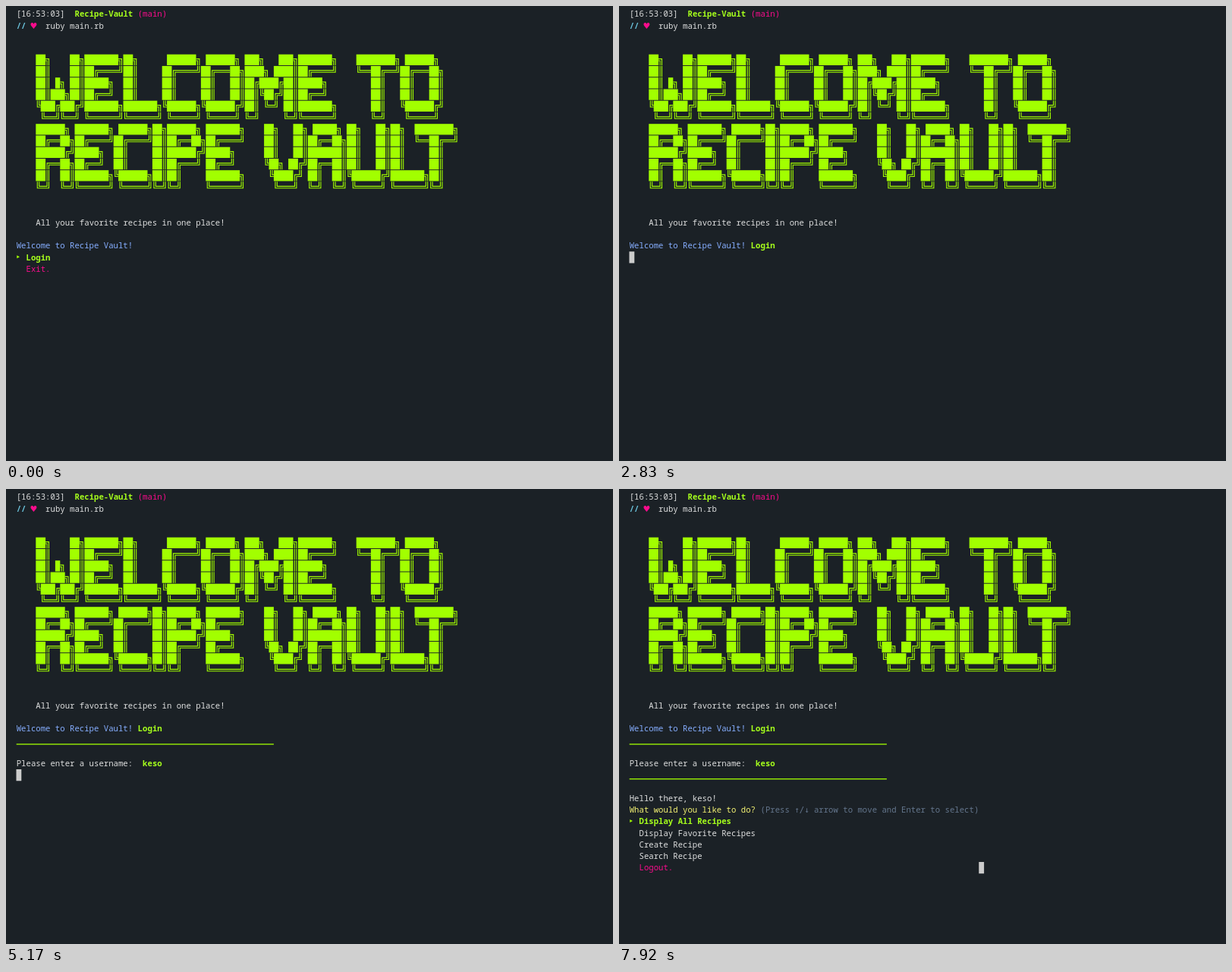
Write an HTML page with a canvas that moves like this. It is 800 by 599 pixels and loops after 8000 ms.

```html
<!DOCTYPE html>
<html lang="en">
<head>
<meta charset="utf-8">
<title>Recipe Vault</title>
<style>
  html, body { margin: 0; width: 100%; height: 100%; overflow: hidden; background: #1b2126; }
  canvas { display: block; }
</style>
</head>
<body>
<canvas id="screen" width="800" height="599"></canvas>
<script>
const ctx = document.getElementById('screen').getContext('2d');
const LOOP = 8000, CELL_W = 6.4, CELL_H = 15.25;
const BG = '#1b2126', GRAY = '#dedfdf', GREEN = '#a2ff00', LIME = '#a6ff1c', PINK = '#fa0c8c',
      BLUE = '#86aeff', CYAN = '#6cc7e0', YELLOW = '#f6f474', DIM = '#64768d';
const MONO = '10.667px "Noto Sans Mono", "DejaVu Sans Mono", monospace';
const FONT = '500 ' + MONO, STRONG = '600 ' + MONO;
const ARROWS = '10.667px "DejaVu Sans Mono", monospace';
const USER = 'keso';

const BANNER = `
██╗    ██╗███████╗██╗      ██████╗ ██████╗ ███╗   ███╗███████╗    ████████╗ ██████╗
██║    ██║██╔════╝██║     ██╔════╝██╔═══██╗████╗ ████║██╔════╝    ╚══██╔══╝██╔═══██╗
██║ █╗ ██║█████╗  ██║     ██║     ██║   ██║██╔████╔██║█████╗         ██║   ██║   ██║
██║███╗██║██╔══╝  ██║     ██║     ██║   ██║██║╚██╔╝██║██╔══╝         ██║   ██║   ██║
╚███╔███╔╝███████╗███████╗╚██████╗╚██████╔╝██║ ╚═╝ ██║███████╗       ██║   ╚██████╔╝
 ╚══╝╚══╝ ╚══════╝╚══════╝ ╚═════╝ ╚═════╝ ╚═╝     ╚═╝╚══════╝       ╚═╝    ╚═════╝
██████╗ ███████╗ ██████╗██╗██████╗ ███████╗    ██╗   ██╗ █████╗ ██╗   ██╗██╗  ████████╗
██╔══██╗██╔════╝██╔════╝██║██╔══██╗██╔════╝    ██║   ██║██╔══██╗██║   ██║██║  ╚══██╔══╝
██████╔╝█████╗  ██║     ██║██████╔╝█████╗      ██║   ██║███████║██║   ██║██║     ██║
██╔══██╗██╔══╝  ██║     ██║██╔═══╝ ██╔══╝      ╚██╗ ██╔╝██╔══██║██║   ██║██║     ██║
██║  ██║███████╗╚██████╗██║██║     ███████╗     ╚████╔╝ ██║  ██║╚██████╔╝███████╗██║
╚═╝  ╚═╝╚══════╝ ╚═════╝╚═╝╚═╝     ╚══════╝      ╚═══╝  ╚═╝  ╚═╝ ╚═════╝ ╚══════╝╚═╝`
  .slice(1).split('\n');

// Direction of the two arms of each corner: [x, y]
const CORNERS = { '╗': [-1, 1], '╔': [1, 1], '╝': [-1, -1], '╚': [1, -1] };

const colX = col => 13.7 + col * CELL_W;
const rowY = row => 3 + row * CELL_H;

function text(col, row, str, color, font = FONT) {
  ctx.font = font;
  ctx.fillStyle = color;
  ctx.fillText(str, colX(col), rowY(row) + 11.4);
}

function poly(...pts) {
  pts.forEach(([x, y], i) => i ? ctx.lineTo(x, y) : ctx.moveTo(x, y));
}

function boxGlyph(ch, col, row) {
  const w = CELL_W / 2, h = 7.2, gap = 1.2;
  const x = colX(col) + w, y = rowY(row) + 6.8;
  for (const d of [-gap, gap]) {
    if (ch === '═') poly([x - w, y + d], [x + w, y + d]);
    else if (ch === '║') poly([x + d, y - h], [x + d, y + h]);
    else {
      const [sx, sy] = CORNERS[ch];
      poly([x + sx * w, y + sy * d], [x + sx * d, y + sy * d], [x + sx * d, y + sy * h]);
    }
  }
}

function banner() {
  ctx.fillStyle = ctx.strokeStyle = GREEN;
  ctx.lineWidth = 1.1;
  ctx.beginPath();
  BANNER.forEach((line, i) => {
    const row = 4 + i;
    for (const m of line.matchAll(/█+|[═║╗╔╝╚]/g)) {
      const col = 4 + m.index;
      if (m[0][0] === '█') ctx.fillRect(colX(col), rowY(row) - 0.3, m[0].length * CELL_W, 14.3);
      else boxGlyph(m[0], col, row);
    }
  });
  ctx.stroke();
}

function cursor(col, row) {
  ctx.fillStyle = '#cccccc';
  ctx.fillRect(colX(col) - 0.2, rowY(row), 6.8, CELL_H);
}

function rule(row) {
  ctx.fillStyle = GREEN;
  ctx.fillRect(colX(0), rowY(row) + 12.1, 53 * CELL_W, 1.3);
}

// The last item of a menu always stays pink
function menu(row, items, selected) {
  items.forEach((item, i) => {
    if (i === items.length - 1) text(2, row + i, item, PINK);
    else if (i === selected) text(2, row + i, item, LIME, STRONG);
    else text(2, row + i, item, GRAY);
  });
  const y = rowY(row + selected) + 7;
  ctx.fillStyle = GREEN;
  ctx.beginPath();
  poly([14.3, y - 2], [18, y], [14.3, y + 2]);
  ctx.fill();
}

function header() {
  text(0, 0, '[16:53:03]', GRAY);
  text(12, 0, 'Recipe-Vault', LIME, STRONG);
  text(25, 0, '(main)', PINK);
  text(0, 1, '//', CYAN, STRONG);
  text(2.8, 1, '♥', PINK, '11px "DejaVu Sans", sans-serif');
  text(6, 1, 'ruby main.rb', GRAY);
  banner();
  text(4, 18, 'All your favorite recipes in one place!', GRAY);
  text(0, 20, 'Welcome to Recipe Vault!', BLUE);
}

function login(t) {
  text(25, 20, 'Login', LIME, STRONG);
  if (t < 3830) return cursor(0, 21);

  rule(21);
  text(0, 23, 'Please enter a username:', GRAY);
  const typed = [4250, 4420, 4750, 4920].filter(at => t >= at).length;
  const entered = t >= 5170;
  text(26, 23, USER.slice(0, typed), entered ? LIME : GRAY, entered ? STRONG : FONT);
  if (!entered) return cursor(26 + typed, 23);
  if (t < 6250) return cursor(0, 24);

  rule(24);
  if (t < 6330) return cursor(53, 24);

  text(0, 26, `Hello there, ${USER}!`, GRAY);
  text(0, 27, 'What would you like to do?', YELLOW);
  text(27, 27, '(Press', DIM);
  text(34, 27, '↑/↓', DIM, ARROWS);
  text(38, 27, 'arrow to move and Enter to select)', DIM);
  menu(28, ['Display All Recipes', 'Display Favorite Recipes', 'Create Recipe',
            'Search Recipe', 'Logout.'], 0);
  cursor(72, 32);
}

function draw(t) {
  ctx.fillStyle = BG;
  ctx.fillRect(0, 0, 800, 599);
  header();
  if (t < 2670) menu(21, ['Login', 'Exit.'], t >= 1580 && t < 2250 ? 1 : 0);
  else login(t);
}

const start = performance.now();
function frame() {
  draw((performance.now() - start) % LOOP);
  requestAnimationFrame(frame);
}
frame();
</script>
</body>
</html>
```
